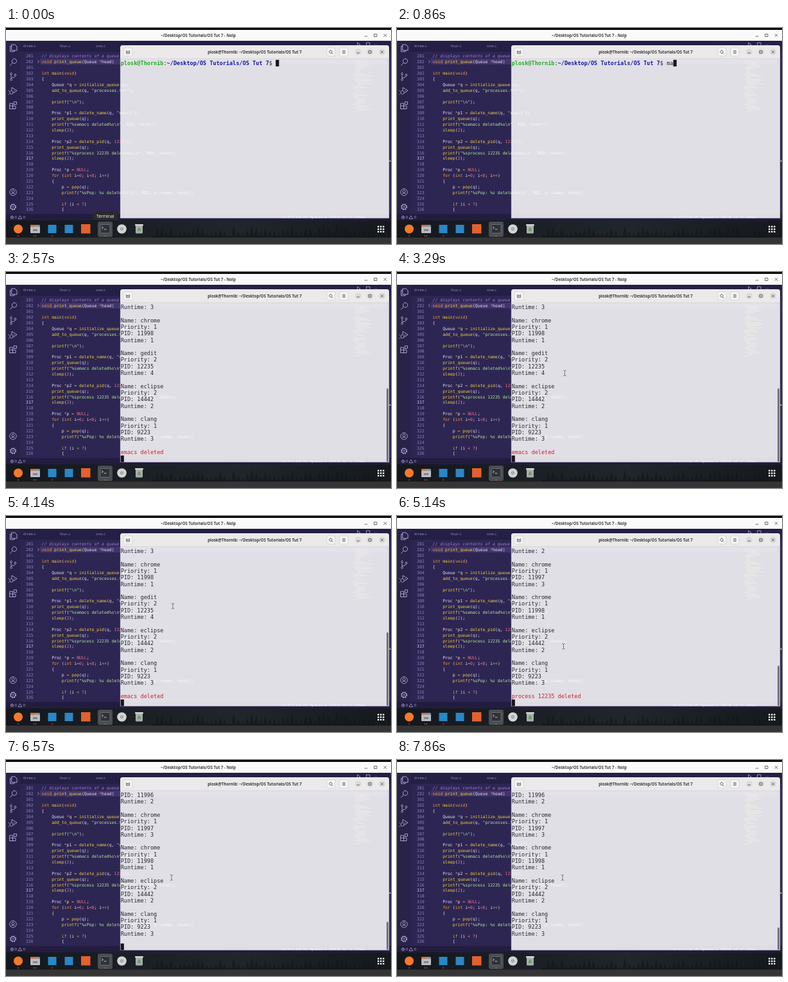
Animation, 600 px wide and 338 px high, one loop 8000 ms. Source, as an HTML page:

```html
<!DOCTYPE html>
<html lang="en">
<head>
<meta charset="utf-8">
<title>Terminal session</title>
<style>
html, body { margin: 0; width: 100%; height: 100%; overflow: hidden; background: #000; }
svg { display: block; width: 100vw; height: 100vh; }
text { white-space: pre; }
.mono { font-family: "DejaVu Sans Mono", monospace; }
.edit { font-size: 6.48px; fill: #e3dcf5; }
.term { font-size: 8.54px; fill: #2b2830; }
.ui { font-family: "Open Sans", "Noto Sans", sans-serif; }
.title { font-weight: 700; font-size: 6.1px; fill: #3a3a3a; text-anchor: middle; }
.line { fill: none; stroke-width: 1; stroke-linecap: round; stroke-linejoin: round; }
</style>
</head>
<body>
<svg id="stage" viewBox="0 0 600 338" preserveAspectRatio="none"></svg>
<script>
const LOOP = 8000;
const USER = 'plosk@Thornib';
const DIR = '~/Desktop/OS Tutorials/OS Tut 7';
const CHAR = 5.141, ROW = 10.32, LEFT = 178.7, TOP = 49.8;

const esc = s => s.replace(/&/g, '&amp;').replace(/</g, '&lt;');
const rect = (x, y, w, h, fill, more = '') =>
  `<rect x="${x}" y="${y}" width="${w}" height="${h}" fill="${fill}" ${more}/>`;
const circle = (x, y, r, fill, more = '') =>
  `<circle cx="${x}" cy="${y}" r="${r}" fill="${fill}" ${more}/>`;
const path = (d, stroke, width = 1) =>
  `<path class="line" d="${d}" stroke="${stroke}" style="stroke-width:${width}"/>`;
const text = (x, y, cls, s, more = '') => `<text x="${x}" y="${y}" class="${cls}" ${more}>${s}</text>`;
const span = (fill, s, more = '') => `<tspan fill="${fill}" ${more}>${esc(s)}</tspan>`;

function seeded(seed) {
  return () => (seed = (seed * 16807) % 2147483647) / 2147483647;
}

// ---- editor ----
const program = `// displays contents of a queue
void print_queue(Queue *head)

int main(void)
{
    Queue *q = initialize_queue(q);
    add_to_queue(q, "processes.txt");

    printf("\\n");

    Proc *p1 = delete_name(q, "emacs");
    print_queue(q);
    printf("%semacs deleted%s\\n", RED, reset);
    sleep(2);

    Proc *p2 = delete_pid(q, 12235);
    print_queue(q);
    printf("%sprocess 12235 deleted%s\\n", RED, reset);
    sleep(2);

    Proc *p = NULL;
    for (int i=0; i<8; i++)
    {
        p = pop(q);
        printf("%sPop: %s deleted%s\\n", RED, p->name, reset);

        if (i < 7)
        {`.split('\n');

const tokens = /(\/\/.*)|("[^"]*")|\b(void|int|for|if)\b|(\w+)(?=\()|\b(\d+|NULL)\b|([=*<+]+|->)/g;
const tokenColors = ['#a878d8', '#b5e69a', '#f0a030', '#f3cf3a', '#f0708c', '#f0a030'];

function highlight(line) {
  let out = '', at = 0;
  for (const m of line.matchAll(tokens)) {
    const kind = m.slice(1).findIndex(g => g !== undefined);
    out += esc(line.slice(at, m.index)) +
      span(tokenColors[kind], m[0], kind ? '' : 'font-style="italic"');
    at = m.index + m[0].length;
  }
  return out + esc(line.slice(at));
}

function editor() {
  let s = rect(0, 20, 600, 282, '#2d2653') + rect(0, 20, 22, 271, '#292249') +
    rect(22, 20, 578, 17, '#241f45') + rect(53, 48, 540, 9, '#41346c') + rect(0, 291, 600, 11, '#221c40');
  [['three.c', 27], ['four.c', 84], ['one.c', 140]].forEach(([name, x]) => {
    s += text(x, 30, 'ui', name, 'font-size="6" fill="#9d93c4"');
  });
  s += path('M548 23l4 3-4 3zM562 23h5v6h-5zM575 26h.1M578 26h.1', '#9d93c4');
  program.forEach((line, i) => {
    const y = (46.4 + i * 8.89).toFixed(2), n = i < 2 ? 281 + i : 299 + i;
    s += text(31, y, 'mono', n, `font-size="6.48" fill="${n === 317 ? '#d8cfff' : '#8d82bd'}"`);
    s += text(55.6, y, 'mono edit', highlight(line));
  });
  s += path('M49.5 50.6l2 2-2 2', '#b0a6d8', .8);

  const rnd = seeded(17);
  for (let y = 51; y < 132; y += 2) {
    const x = 541 + Math.floor(rnd() * 3) * 3;
    s += rect(x, y, (4 + rnd() * 22).toFixed(1), .9, '#c8bb8c', 'opacity=".55"');
  }
  s += rect(597, 207.5, 3, 1.5, '#c9a94a');
  s += text(13.5, 298.4, 'ui', '0', 'font-size="6" fill="#b9b0dc"') +
    text(26.5, 298.4, 'ui', '0', 'font-size="6" fill="#b9b0dc"') +
    path('M9.5 294a2.3 2.3 0 1 1-.1 0M8.4 295.2l2.2 2.2M10.6 295.2l-2.2 2.2M22 294l2.7 4.6h-5.4z', '#b9b0dc', .7) +
    text(430, 298.4, 'ui', 'Ln 317, Col 14   Spaces: 4   UTF-8   LF   C   Linux', 'font-size="6" fill="#e0d8ff"');
  return s + sideIcons();
}

function sideIcons() {
  const c = '#aaa1cf';
  return path('M9 26h5l3 3v6H9zM9 28.5H6.5V37H13v-2', c) +
    path('M13 48a3.7 3.7 0 1 1-.1 0M10.3 54.3L6.5 58.5', c) +
    path('M8 73v6M8 79.2a1.5 1.5 0 1 1-.1 0M8 70a1.5 1.5 0 1 1-.1 0M14.5 72a1.5 1.5 0 1 1-.1 0M14.4 75c0 3-4 2-6 3.5', c) +
    path('M9 97v-4l8 5-6 4M8.5 98a2.5 2.8 0 1 1-.1 0M5 99l-1-1M12 99l1-1M5 103l-1 1', c) +
    path('M6 118h4.5v8.5H6zM6 122h9v4.5H6M12.5 115.5h4v4h-4z', c) +
    path('M11 251.5a5.3 5.3 0 1 1-.1 0M11 253.5a2 2 0 1 1-.1 0M7.5 260.5c1-3 6-3 7 0', c) +
    circle(11, 280, 4.2, 'none', `stroke="${c}" stroke-width="1.8" stroke-dasharray="2 1.3"`) +
    circle(11, 280, 3.4, 'none', `stroke="${c}" stroke-width=".9"`) + circle(11, 280, 1.1, c);
}

// ---- desktop ----
function topBar() {
  return rect(0, 0, 600, 3, '#0a0a0a') + rect(0, 3, 600, 17, '#fafafa') +
    text(299.5, 13.6, 'ui title', DIR + ' - Nolp') +
    path('M559 13h4M574 9.5h4v4h-4zM589 9.5l4 4M593 9.5l-4 4', '#4a4a4a', .8);
}

function dock() {
  let s = rect(0, 301, 600, 27, 'url(#night)') + rect(0, 328, 600, 10, '#353535');
  const rnd = seeded(5);
  for (let x = 225; x < 575; x += 7) {
    const h = (5 + rnd() * 15).toFixed(1);
    s += `<path d="M${x} 328l4-${h} 4 ${h}z" fill="#10161a" opacity=".6"/>`;
  }
  s += rect(143, 303, 23, 24, '#4a4e54', 'rx="3"');
  s += circle(19, 314.5, 7, '#f5792a');
  s += rect(38, 308, 15, 13, '#8b8f94', 'rx="1.5"') + rect(38, 308, 7, 3, '#e0702f', 'rx="1"') +
    rect(38, 311, 15, 10, '#b9bcc0', 'rx="1.5"') + rect(42, 315, 7, 2.5, '#777b80');
  s += rect(65.5, 308, 13, 13, '#2489ca');
  s += rect(91.5, 308, 13, 13, '#2d86c4');
  s += rect(117, 307, 14.5, 14.5, '#e4602f');
  s += rect(147, 307.5, 15, 13.5, '#2f3136', 'rx="1.5" stroke="#777b80" stroke-width=".8"') +
    path('M149.5 311l2 1.5-2 1.5M153 315h3', '#eee', .8);
  s += circle(180.5, 314.5, 7.3, '#d4d4d4') + circle(180.5, 314.5, 2.4, '#8c8c8c') + circle(180.5, 314.5, 1, '#eee');
  s += rect(202, 307.5, 11, 14, '#a9aca8', 'rx="1.5"') + rect(201, 307, 13, 2.5, '#d3d5d2', 'rx="1"') +
    path('M205.5 317l2-4 2 4z', '#4f9a4c', 1.2);
  [19, 43.5, 46.5, 72, 154.5].forEach(x => s += circle(x, 325.3, .9, '#e95420'));
  for (let i = 0; i < 9; i++)
    s += rect(579 + i % 3 * 4, 309.5 + Math.floor(i / 3) * 4, 2.5, 2.5, '#f2f2f2', 'rx=".6"');
  return s;
}

// ---- terminal ----
function termFrame() {
  const button = (x, w = 13) => rect(x, 31, w, 13, '#f5f4f4', 'rx="2.5" stroke="#d0cdcd" stroke-width=".7"');
  return rect(178, 48, 419, 249.5, '#fff', 'fill-opacity=".85"') +
    '<path d="M178 48V30.5a3.5 3.5 0 0 1 3.5-3.5h412a3.5 3.5 0 0 1 3.5 3.5V48z" fill="#ebe9e9"/>' +
    path('M178 48h419', '#d2cfd2', .7) +
    path('M178.3 48v249.5h418.5V48', '#b4aec4', .6) +
    button(183, 14) + button(500) + button(520) +
    path('M187.5 35.5v4.5h5v-4.5M190 36v2.5M188.8 37.3h2.4', '#444', .8) +
    path('M506 35a2.2 2.2 0 1 1-.1 0M507.6 39l1.7 1.7M524.5 35.5h4M524.5 37.5h4M524.5 39.5h4', '#444', .8) +
    [548.8, 567.3, 586].map(x => circle(x, 37.5, 5, '#dcdada')).join('') +
    path('M547 39h3.6M565.5 35.7h3.6v3.6h-3.6zM584.3 35.8l3.4 3.4M587.7 35.8l-3.4 3.4', '#3a3a3a', .8) +
    text(387.5, 39.7, 'ui title', `${USER}: ${DIR}`);
}

const rowText = (row, s, more) => text(LEFT, (TOP + 8.1 + row * ROW).toFixed(2), 'mono term', s, more);

const queue = [
  ['chrome', 1, 11996, 2], ['chrome', 1, 11997, 3], ['chrome', 1, 11998, 1],
  ['gedit', 2, 12235, 4], ['eclipse', 2, 14442, 2], ['clang', 1, 9223, 3]
];

function output(procs, message) {
  const lines = procs.flatMap(([name, prio, pid, time]) =>
    ['Name: ' + name, 'Priority: ' + prio, 'PID: ' + pid, 'Runtime: ' + time, '']);
  if (message) lines.push(message);
  return lines.slice(-23).map((line, i) =>
    rowText(i, line, line && line === message ? 'style="fill:#cc1f26"' : '')).join('');
}

const left = queue.filter(p => p[2] !== 12235);
const prompt = rowText(0,
  span('#1fae1f', USER, 'font-weight="700"') + ':' +
  span('#1616a2', DIR, 'font-weight="700"') + '$ <tspan id="typed"></tspan>');
const screens = [prompt, output(queue, 'emacs deleted'), output(left, 'process 12235 deleted'), output(left)];

const beam = 'M-2-4.5q2 0 2 1.5v6q0 1.5-2 1.5M2-4.5q-2 0-2 1.5M2 4.5q-2 0-2-1.5';
const stage = document.getElementById('stage');
stage.innerHTML =
  `<defs><linearGradient id="night" x1="0" x2="1">
    <stop offset="0" stop-color="#14171d"/><stop offset=".6" stop-color="#20262b"/><stop offset="1" stop-color="#15191d"/>
  </linearGradient></defs>` +
  editor() + topBar() + dock() + termFrame() +
  screens.map(s => `<g class="screen">${s}</g>`).join('') +
  rect(0, 0, CHAR, ROW, '#17131c', 'id="caret"') +
  rect(593, 0, 3, 0, '#77747c', 'id="thumb" rx="1.5"') +
  `<g id="mouse">${path(beam, '#fff', 1.8)}${path(beam, '#55525c', .9)}</g>` +
  `<g id="tip">${rect(135, 287.5, 39.5, 13, '#2a2a2c', 'rx="4"')}
    ${text(154.7, 296.5, 'ui', 'Terminal', 'font-size="6.8" fill="#fff" text-anchor="middle"')}</g>`;

const groups = stage.querySelectorAll('.screen');
const [typed, caret, thumb, mouse, tip] =
  ['typed', 'caret', 'thumb', 'mouse', 'tip'].map(id => document.getElementById(id));

// ---- timeline ----
const last = (steps, t) => steps.reduce((v, [at, value]) => t >= at ? value : v, steps[0][1]);
const command = 'make run';
const keys = [[0, 0], [570, 1], [860, 2], [1000, 3], [1140, 4], [1290, 5], [1570, 6], [2000, 8]];
const shown = [[0, 0], [2570, 1], [4570, 2], [6570, 3]];
const thumbTop = [[0, 297], [2570, 182], [4570, 234], [6570, 253], [7860, 262]];
const route = [[3140, 262, 165], [3570, 260, 141], [4140, 260, 141], [4860, 259.5, 204],
  [5140, 259.5, 204], [6140, 258, 184], [LOOP, 258, 184]];

function along(t) {
  const i = Math.max(1, route.findIndex(p => p[0] >= t));
  const a = route[i - 1], b = route[i];
  let k = Math.min(1, Math.max(0, (t - a[0]) / (b[0] - a[0])));
  k = k * k * (3 - 2 * k);
  return [a[1] + (b[1] - a[1]) * k, a[2] + (b[2] - a[2]) * k];
}

const show = (el, on) => el.setAttribute('visibility', on ? 'visible' : 'hidden');

function draw(t) {
  const screen = last(shown, t), count = last(keys, t), top = last(thumbTop, t);
  groups.forEach((g, i) => show(g, i === screen));
  typed.textContent = command.slice(0, count);

  const entered = t >= 2290;
  const col = entered ? 0 : 47 + count;
  const row = screen ? 23 : entered ? 1 : 0;
  caret.setAttribute('x', LEFT + col * CHAR);
  caret.setAttribute('y', TOP + row * ROW);
  show(caret, t < 7860);

  thumb.setAttribute('y', top);
  thumb.setAttribute('height', 297 - top);
  show(thumb, screen > 0);

  mouse.setAttribute('transform', `translate(${along(t)})`);
  show(mouse, t >= 3140);
  tip.setAttribute('opacity', Math.min(1, Math.max(0, 1 - (t - 140) / 290)));
}

const start = performance.now();
function frame() {
  draw((performance.now() - start) % LOOP);
  requestAnimationFrame(frame);
}
frame();
</script>
</body>
</html>
```
